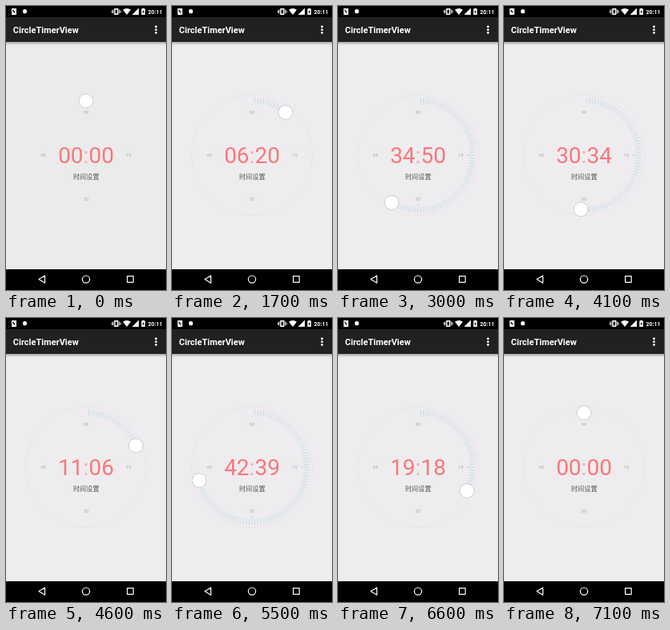
Animation of 200 by 356 pixels, one loop 8 s. Source, as an HTML page:

```html
<!DOCTYPE html>
<html lang="zh">
<head>
<meta charset="utf-8">
<title>CircleTimerView</title>
<style>
  html, body { margin: 0; width: 100%; height: 100%; overflow: hidden; background: #000; }
  svg { display: block; width: 100vw; height: 100vh; font-family: Roboto, sans-serif; }
  .label { font-size: 5.8px; fill: #adadad; text-anchor: middle; }
  .time { font-size: 28px; fill: #f9777c; text-anchor: middle; }
  .caption { font: 300 8.2px "Noto Sans CJK SC", "Noto Sans CJK", sans-serif; fill: #555; text-anchor: middle; }
</style>
</head>
<body>
<svg viewBox="0 0 200 356">
  <defs>
    <linearGradient id="shade" x1="0" y1="0" x2="0" y2="1">
      <stop offset="0" stop-color="#000" stop-opacity=".3"/>
      <stop offset="1" stop-color="#000" stop-opacity="0"/>
    </linearGradient>
  </defs>
  <rect width="200" height="356"/>
  <rect id="page" y="45" width="200" height="285"/>
  <rect y="45" width="200" height="4" fill="url(#shade)"/>
  <rect y="14" width="200" height="31" fill="#212121"/>

  <!-- status bar -->
  <g fill="#fff">
    <path d="M7 3h6v8H7z"/>
    <path d="M8.4 5l2.6 3.4" stroke="#000" stroke-width="1.3"/>
    <circle cx="23.5" cy="6.7" r="2.6"/>
    <path d="M135.2 3h5.2v8h-5.2z"/>
    <path d="M136.6 4.6h2.4v4.8h-2.4z" fill="#000"/>
    <path d="M133.4 4.4h1v5.2h-1zM141.2 4.4h1v5.2h-1zM132 5.5h.9v3h-.9zM142.7 5.5h.9v3h-.9z"/>
    <path d="M146 4.8Q151 1.2 156 4.8L151 11z"/>
    <path d="M157.5 11l8.5-8.5V11z"/>
    <path d="M169.3 3.6h1.3v-.9h2v.9h1.3V11h-4.6z"/>
    <path d="M172 4.7l-1.5 3h1v2l1.5-3h-1z" fill="#000"/>
    <text x="195.6" y="9.6" font-size="7" font-weight="700" text-anchor="end">20:11</text>
  </g>

  <!-- app bar -->
  <g fill="#fff">
    <text x="8.8" y="33.7" font-size="11" font-weight="700">CircleTimerView</text>
    <circle cx="187.5" cy="26" r="1.4"/>
    <circle cx="187.5" cy="29.8" r="1.4"/>
    <circle cx="187.5" cy="33.6" r="1.4"/>
  </g>

  <!-- navigation bar -->
  <g fill="none" stroke="#fff" stroke-width="1.2" stroke-linejoin="round">
    <path d="M48.6 338v9.2l-7.6-4.6z"/>
    <circle cx="100" cy="342.6" r="4.6"/>
    <path d="M151.6 338.7h7.6v7.6h-7.6z"/>
  </g>

  <!-- timer -->
  <circle id="ring" cx="100" cy="187" r="75.5" fill="none" stroke="#e5e3e4" stroke-width=".7"/>
  <path id="ticks" fill="none" stroke="#b3d5e6" stroke-width=".7"/>
  <text class="label" x="100" y="135">60</text>
  <text class="label" x="153.2" y="189">15</text>
  <text class="label" x="100" y="243.8">30</text>
  <text class="label" x="46.5" y="189">45</text>
  <text class="time" x="100" y="197.4"><tspan id="min"></tspan><tspan fill-opacity=".55">:</tspan><tspan id="sec"></tspan></text>
  <text class="caption" x="100.3" y="216.9">时间设置</text>
  <circle id="knob" r="8.9" fill="#fff" stroke="#b4b4b4" stroke-width=".6"/>
</svg>
<script>
  const LOOP = 8000, STEP = 100, CX = 100, CY = 187;
  // [time in ms, timer value in seconds]; ten seconds turn the knob by one degree
  const keys = [
    [0, 0], [1100, 0], [1700, 380], [2000, 470], [2900, 1970], [3000, 2090],
    [3400, 2600], [3800, 2600], [4100, 1834], [4600, 666], [4900, 666],
    [5500, 2559], [5800, 3440], [5900, 3460], [6600, 1158], [6700, 920],
    [7100, 0], [LOOP, 0]
  ];
  const el = id => document.getElementById(id);
  const [page, ring, ticks, knob, min, sec] =
    ["page", "ring", "ticks", "knob", "min", "sec"].map(el);

  function valueAt(t) {
    const i = keys.findIndex(k => k[0] > t);
    const [t0, v0] = keys[i - 1], [t1, v1] = keys[i];
    return Math.round(v0 + (v1 - v0) * (t - t0) / (t1 - t0));
  }

  function polar(deg, r) {
    const a = deg * Math.PI / 180;
    return [CX + r * Math.sin(a), CY - r * Math.cos(a)].map(n => n.toFixed(2));
  }

  // quarter marks reach further inwards
  function tickPath(end) {
    let d = "";
    for (let a = 3; a < end; a += 3) {
      d += `M${polar(a, a % 90 ? 65 : 60)}L${polar(a, 72)}`;
    }
    return d;
  }

  const pad = n => String(n).padStart(2, "0");

  function draw(t) {
    const value = valueAt(t), deg = value / 10;
    const touched = t >= 1200;
    page.setAttribute("fill", touched ? "#eeecee" : "#ebebeb");
    ring.setAttribute("visibility", touched ? "visible" : "hidden");
    ticks.setAttribute("d", tickPath(deg));
    const [x, y] = polar(deg, 68);
    knob.setAttribute("cx", x);
    knob.setAttribute("cy", y);
    min.textContent = pad(Math.floor(value / 60));
    sec.textContent = pad(value % 60);
  }

  const start = performance.now();
  function frame() {
    const t = (performance.now() - start) % LOOP;
    draw(Math.floor(t / STEP) * STEP);
    requestAnimationFrame(frame);
  }
  frame();
</script>
</body>
</html>
```
